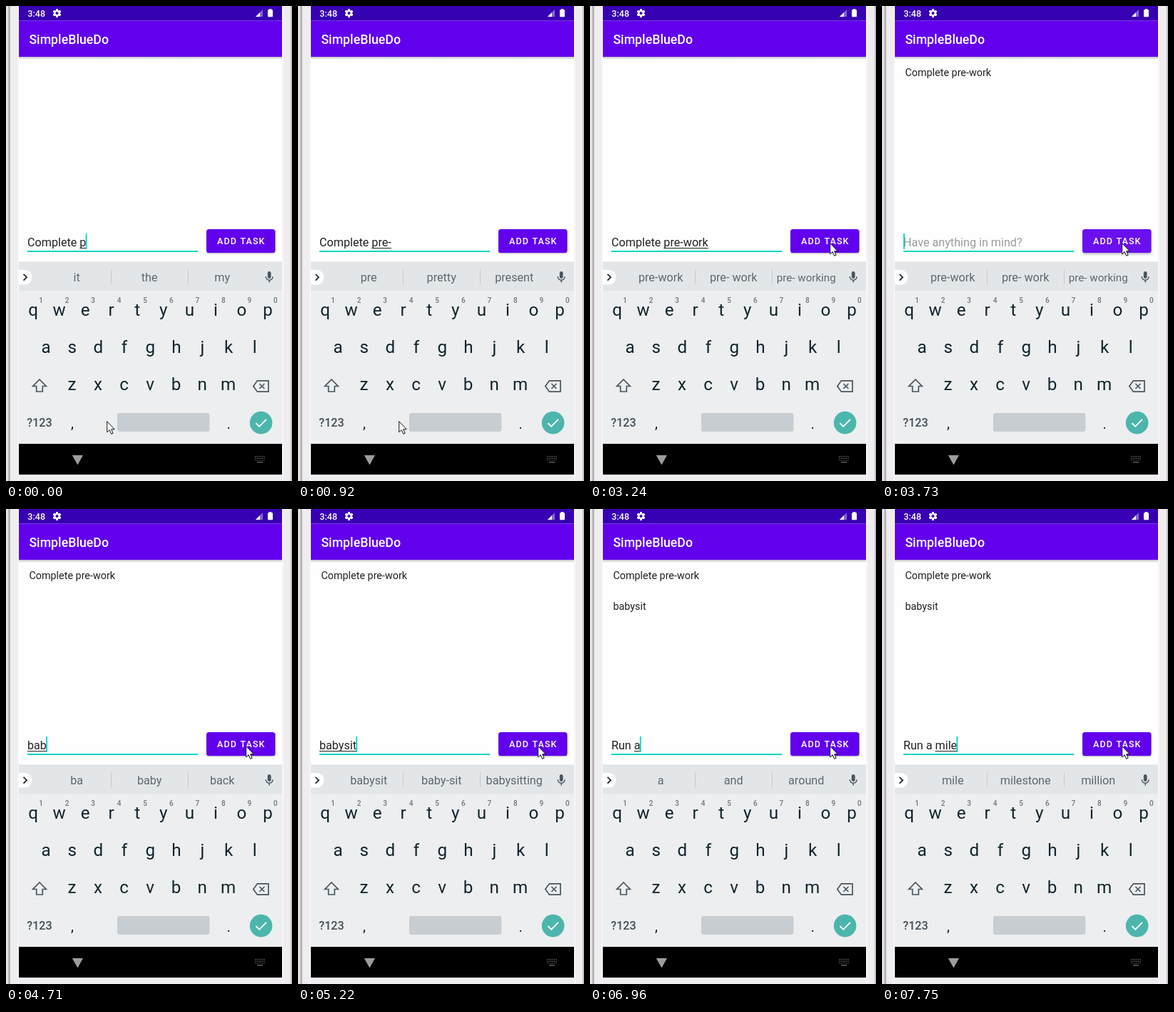
An HTML page with a canvas for the animation above (8 s loop, 401x664 px).

```html
<!DOCTYPE html>
<html lang="en">
<head>
<meta charset="utf-8">
<title>To-do list</title>
<style>
  html, body { margin: 0; width: 100%; height: 100%; overflow: hidden; background: #efedf0; }
  canvas { display: block; width: 401px; height: 664px; }
</style>
</head>
<body>
<canvas id="stage"></canvas>
<script>
const W = 401, H = 664, LOOP = 8000;
const canvas = document.getElementById('stage');
const ratio = window.devicePixelRatio || 1;
canvas.width = W * ratio;
canvas.height = H * ratio;
const ctx = canvas.getContext('2d');
ctx.scale(ratio, ratio);

const TEAL = '#03d4c4', PURPLE = '#6200ee', KEY = '#10242c', ICON = '#48565d';
const FIELD_SIZE = 16.16, FIELD_X = 30, HINT_MAX = 83;
const TASKS = ['Complete pre-work', 'babysit'];

// Each cue changes part of the state from its time on.
const CUES = [
  [0, { text: 'Complete p', caret: true, hints: 'it|the|my', tasks: 0, press: 0, mouse: [141, 580] }],
  [150, { text: 'Complete pr', hints: 'p|please|problem' }],
  [300, { text: 'Complete pre', hints: 'pr|pretty|project' }],
  [420, { text: 'Complete pre-', hints: 'pre|pretty|present' }],
  [920, { caret: false }],
  [1420, { text: 'Complete pre-wo', caret: true, hints: 'pre-w|pre-war|pre-wedding' }],
  [1540, { text: 'Complete pre-wor', hints: 'pre-wo|pre-work|pre-wo ready' }],
  [1690, { hints: 'pre-wor|pre-work|pre-wo really' }],
  [1840, { text: 'Complete pre-work', hints: 'pre-work|pre- work|pre- working' }],
  [2270, { caret: false }],
  [2700, { caret: true, mouse: [236, 547] }],
  [2820, { mouse: [384, 474] }],
  [2940, { mouse: [313, 419] }],
  [3090, { mouse: [332, 336] }],
  [3240, { caret: false, mouse: [336, 331] }],
  [3490, { press: 0.7 }],
  [3610, { text: '', caret: true, press: 1 }],
  [3730, { tasks: 1, press: 0.35 }],
  [3850, { hints: 'thanks|I|we', press: 0 }],
  [4130, { caret: false }],
  [4410, { text: 'b', caret: true }],
  [4560, { text: 'ba', hints: 'b|be|back' }],
  [4710, { text: 'bab', hints: 'ba|baby|back' }],
  [4830, { text: 'baby', hints: 'bab|baby|babe' }],
  [4950, { text: 'babys', hints: 'baby|babies|babysitting' }],
  [5100, { text: 'babysi', hints: 'babys|babysit|babysitting' }],
  [5220, { text: 'babysit', hints: 'babysit|baby-sit|babysitting' }],
  [5620, { caret: false, press: 0.7 }],
  [5740, { text: '', caret: true, press: 1 }],
  [5890, { tasks: 2, press: 0.35 }],
  [6010, { hints: 'thanks|I|we', press: 0 }],
  [6290, { caret: false }],
  [6570, { text: 'R', caret: true }],
  [6690, { text: 'Ru', hints: 'R|Re|Really' }],
  [6810, { text: 'Run ', hints: 'the|to|and' }],
  [6960, { text: 'Run a', hints: 'a|and|around' }],
  [7080, { text: 'Run a ', hints: 'few|little|good' }],
  [7330, { text: 'Run a m', hints: 'few|little|message' }],
  [7450, { hints: 'm|mile|my' }],
  [7600, { text: 'Run a mi', hints: 'mi|mile|my' }],
  [7750, { text: 'Run a mile', hints: 'mile|milestone|million' }]
];

function stateAt(t) {
  const state = {};
  for (const [at, change] of CUES) if (at <= t) Object.assign(state, change);
  return state;
}

function box(x, y, w, h, color, radius = 0) {
  ctx.fillStyle = color;
  ctx.beginPath();
  ctx.roundRect(x, y, w, h, radius);
  ctx.fill();
}

function disc(x, y, r, color) {
  ctx.fillStyle = color;
  ctx.beginPath();
  ctx.arc(x, y, r, 0, Math.PI * 2);
  ctx.fill();
}

function path(points, closed) {
  ctx.beginPath();
  for (let i = 0; i < points.length; i += 2) ctx.lineTo(points[i], points[i + 1]);
  if (closed) ctx.closePath();
}

function fillPath(points, color) {
  path(points, true);
  ctx.fillStyle = color;
  ctx.fill();
}

function strokePath(points, color, width, closed = false) {
  path(points, closed);
  ctx.strokeStyle = color;
  ctx.lineWidth = width;
  ctx.stroke();
}

function setFont(size, weight = 400) {
  ctx.font = `${weight} ${size}px Roboto, sans-serif`;
}

function label(str, x, y, size, color, align = 'left', weight = 400) {
  setFont(size, weight);
  ctx.textAlign = align;
  ctx.fillStyle = color;
  ctx.fillText(str, x, y);
}

function fade(y, h, alpha) {
  const g = ctx.createLinearGradient(0, y, 0, y + h);
  g.addColorStop(0, `rgba(0,0,0,${alpha})`);
  g.addColorStop(1, 'rgba(0,0,0,0)');
  ctx.fillStyle = g;
  ctx.fillRect(18, y, 369, h);
}

function drawFrame() {
  box(0, 0, W, H, '#efedf0');
  box(0, 0, 3, H, '#e6e3e6');
  box(3, 0, 1, H, '#c5c1c5');
  box(4, 0, 1.5, H, '#a09ca0');
  box(5.5, 0, 1, H, '#dedade');
  box(16.5, 0, 1.5, H, '#f8f7f8');
  box(387, 0, 2, H, '#f8f7f8');
  box(398.5, 0, 1, H, '#dad7da');
  box(399.5, 0, 1.5, H, '#bcb8bc');
}

function drawGear(x, y) {
  ctx.save();
  ctx.translate(x, y);
  for (let i = 0; i < 6; i++) {
    box(-1.5, -5.8, 3, 11.6, '#fff', 0.6);
    ctx.rotate(Math.PI / 3);
  }
  disc(0, 0, 4.3, '#fff');
  disc(0, 0, 2, '#3700b3');
  ctx.restore();
}

function drawBars() {
  box(18, 71, 369, 287, '#fefefe');
  fade(71, 4, 0.24);
  box(18, 0, 369, 20.5, '#3700b3');
  box(18, 20.5, 369, 50.5, PURPLE);
  label('3:48', 30.3, 15, 12.6, '#fff', 'left', 500);
  drawGear(71.5, 10);
  fillPath([360, 5, 360, 15, 350, 15], 'rgba(255,255,255,.4)');
  fillPath([356, 9, 356, 15, 350, 15], '#fff');
  box(367, 5.2, 7, 10, '#fff', 0.8);
  box(368.8, 4, 3.4, 2, '#fff');
  label('SimpleBlueDo', 32.4, 52.5, 17.75, '#fff', 'left', 500);
}

function drawField({ text, caret }) {
  box(FIELD_X, 342, 239, 2, TEAL);
  setFont(FIELD_SIZE);
  const widthOf = str => ctx.measureText(str).width;
  const end = FIELD_X + widthOf(text);
  if (text) {
    label(text, FIELD_X, 336, FIELD_SIZE, '#212121');
    const start = FIELD_X + widthOf(text.slice(0, text.lastIndexOf(' ') + 1));
    box(start, 338, end - start, 1, '#212121');
  } else {
    label('Have anything in mind?', FIELD_X, 336, FIELD_SIZE, '#9b9b9b');
  }
  if (caret) box(Math.max(FIELD_X, end - 0.7), 318, 1.8, 22, TEAL);
}

function drawButton(press) {
  ctx.save();
  ctx.shadowColor = `rgba(0,0,0,${0.25 + press * 0.08})`;
  ctx.shadowBlur = (2 + press * 4) * ratio;
  ctx.shadowOffsetY = (1.2 + press * 2) * ratio;
  box(281, 312, 96.5, 33, PURPLE, 3.6);
  ctx.restore();
  if (press) box(281, 312, 96.5, 33, `rgba(255,255,255,${press * 0.17})`, 3.6);
  ctx.letterSpacing = '1.12px';
  label('ADD TASK', 296, 333, 12.57, '#fff', 'left', 500);
  ctx.letterSpacing = '0px';
}

function drawMic(x, y) {
  box(x - 2.4, y - 8, 4.8, 10, ICON, 2.4);
  ctx.strokeStyle = ICON;
  ctx.lineWidth = 1.5;
  ctx.beginPath();
  ctx.arc(x, y - 0.8, 5, 0, Math.PI);
  ctx.moveTo(x, y + 4.2);
  ctx.lineTo(x, y + 7.5);
  ctx.stroke();
}

// Long suggestions use a smaller size so that they stay inside their slot.
function drawHint(word, x) {
  setFont(FIELD_SIZE);
  const fit = Math.min(1, HINT_MAX / ctx.measureText(word).width);
  label(word, x, 385, FIELD_SIZE * fit, '#5c686e', 'center');
}

function drawSuggestions(hints) {
  box(18, 358, 369, 40, '#e3e6e8');
  box(18, 357.5, 369, 1, '#dcdfe1');
  box(18, 369, 18.5, 20.5, '#fff', [0, 10, 10, 0]);
  strokePath([24.6, 374.8, 29, 379.2, 24.6, 383.6], '#202a2e', 1.8);
  box(147, 368, 1, 21, '#c6cbce');
  box(255, 368, 1, 21, '#c6cbce');
  hints.split('|').forEach((word, i) => drawHint(word, 99.2 + i * 102));
  drawMic(369.2, 379);
}

function drawKeys() {
  const step = 36.55;
  box(18, 398, 369, 214, '#eceef0');
  const row = (letters, x, y) => [...letters].forEach((ch, i) =>
    label(ch, x + i * step, y, 24.2, KEY, 'center'));
  row('qwertyuiop', 38, 433);
  row('asdfghjkl', 56.2, 485);
  row('zxcvbnm', 92.4, 537);
  [...'1234567890'].forEach((ch, i) =>
    label(ch, 49 + i * step, 414.6, 10, '#6c777c', 'center', 500));

  strokePath([47, 522, 56.3, 531.5, 51.3, 531.5, 51.3, 539, 42.7, 539, 42.7, 531.5, 37.7, 531.5], ICON, 1.7, true);
  strokePath([346.8, 531.5, 352.4, 523.8, 368, 523.8, 368, 539.2, 352.4, 539.2], ICON, 1.7, true);
  strokePath([355.4, 528, 362.4, 535], ICON, 1.7);
  strokePath([362.4, 528, 355.4, 535], ICON, 1.7);

  label('?123', 47, 588, 16.2, '#425057', 'center', 500);
  label(',', 93, 590, 20, KEY, 'center');
  label('.', 312.2, 591, 20, KEY, 'center');
  box(156, 569, 129.3, 26, '#c8cdd1', 3);
  disc(357.6, 582.6, 15.8, '#4db6ac');
  strokePath([350.4, 583, 355.2, 587.8, 365, 577.8], '#fff', 1.8);
}

function drawNav() {
  box(18, 612, 369, 43, '#000');
  fillPath([92.8, 628, 108, 628, 100.4, 641.5], '#9d9d9d');
  for (let r = 0; r < 3; r++)
    for (let c = 0; c < 6; c++) box(349 + c * 2.5, 629 + r * 2.7, 1.2, 1.2, '#747474');
  box(352, 637.2, 8, 1.2, '#747474');
}

function drawMouse([x, y]) {
  ctx.save();
  ctx.translate(x + 0.7, y + 0.7);
  const arrow = [0, 0, 0, 15, 3.5, 11.9, 6, 17.6, 8.4, 16.5, 6, 11, 10.5, 11];
  fillPath(arrow, '#fff');
  strokePath(arrow, '#111', 1, true);
  ctx.restore();
}

function draw(t) {
  const state = stateAt(t);
  drawFrame();
  drawBars();
  TASKS.slice(0, state.tasks).forEach((task, i) =>
    label(task, 32.4, 98 + i * 43, 14.37, '#212121'));
  drawField(state);
  drawButton(state.press);
  drawSuggestions(state.hints);
  drawKeys();
  drawNav();
  drawMouse(state.mouse);
}

const begin = performance.now();
function tick() {
  draw((performance.now() - begin) % LOOP);
  requestAnimationFrame(tick);
}
tick();
</script>
</body>
</html>
```
